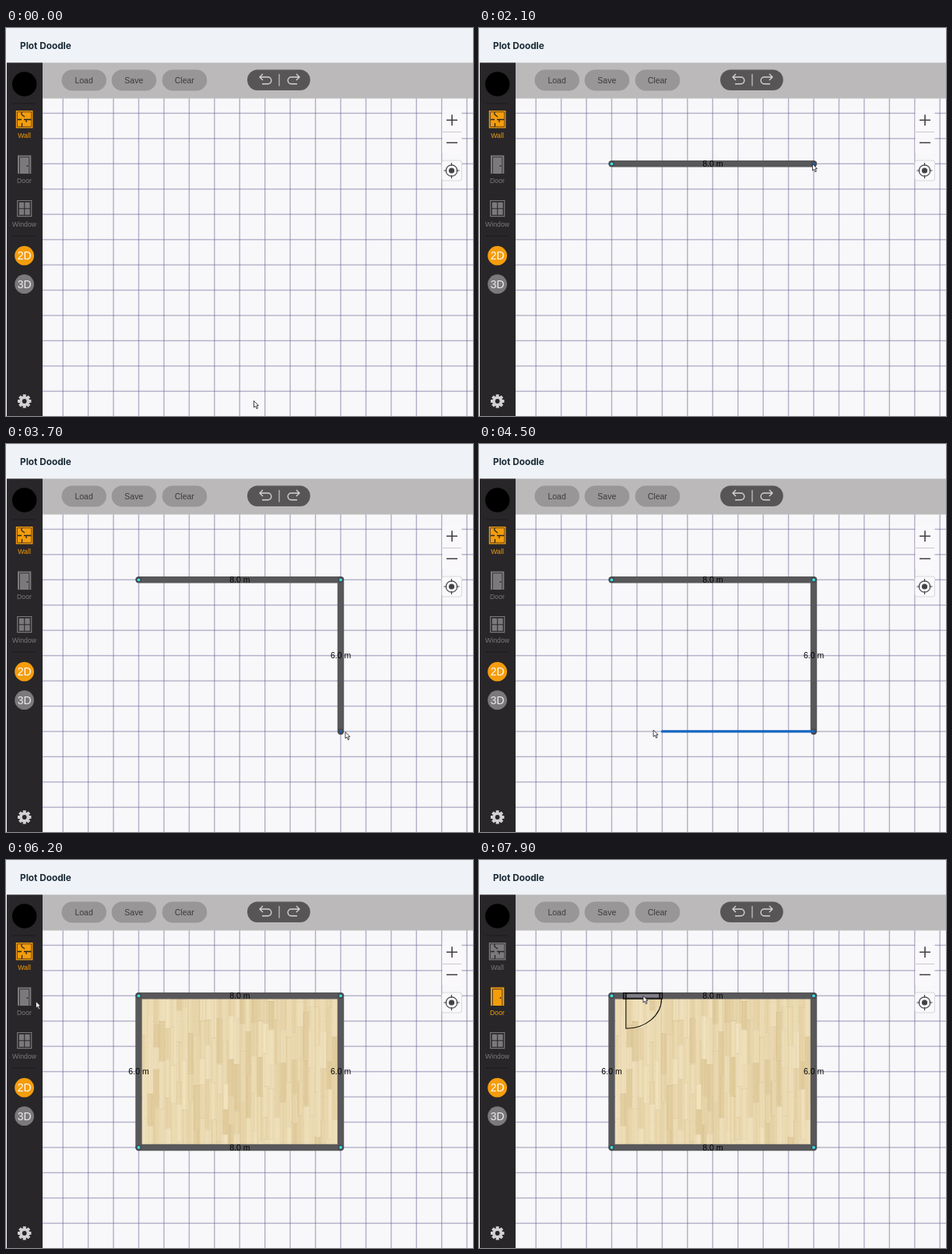
Recreate the animation shown at these times as an HTML page with a canvas. Size 600 by 498 pixels, loop 8 s.

```html
<!DOCTYPE html>
<html lang="en">
<head>
<meta charset="utf-8">
<title>Plot Doodle</title>
<style>
  html, body { margin: 0; width: 100%; height: 100%; overflow: hidden; background: #f8f7f9; }
  canvas { display: block; width: 600px; height: 498px; }
</style>
</head>
<body>
<canvas id="stage" width="600" height="498"></canvas>
<script>
const ctx = document.getElementById('stage').getContext('2d');
const LOOP = 8000, STEP = 100;
const CELL = 32.44, ORIGIN = { x: 170.5, y: 174.3 };
const ORANGE = '#f49d0c', GREY = '#7b797b', DARK = '#282629', WALL = '#58575a';
const SANS = '"Liberation Sans", Arial, sans-serif';

const gridPoint = (col, row) => ({ x: ORIGIN.x + col * CELL, y: ORIGIN.y + row * CELL });
const corners = [gridPoint(0, 0), gridPoint(8, 0), gridPoint(8, 6), gridPoint(0, 6)];
const wallTimes = [2100, 3500, 4700, 5500];
const drawStart = 1600, closed = 5500, doorPicked = 6500;

// time, x, y of the pointer tip
const pointerPath = [
  [0, 318, 478], [400, 262, 300], [500, 262, 300], [1300, 196, 199],
  [1500, 171, 176], [1600, 171, 176], [2100, 428, 174], [2200, 428, 176],
  [2300, 428, 229], [2800, 440, 263], [3200, 436, 369], [3700, 435.5, 369],
  [3900, 434, 369], [4000, 424, 369], [4700, 174, 366], [4900, 171, 366],
  [5200, 169.5, 176], [5300, 169.5, 174], [5900, 165, 178], [6200, 38, 181],
  [6400, 26, 182], [6700, 26, 182], [7300, 200, 176], [7600, 210.5, 174], [8000, 210.5, 174]
];

function pointerAt(t) {
  const i = pointerPath.findIndex(p => p[0] > t);
  const [t0, x0, y0] = pointerPath[i - 1], [t1, x1, y1] = pointerPath[i];
  const u = (t - t0) / (t1 - t0), k = u * u * (3 - 2 * u);
  return { x: x0 + (x1 - x0) * k, y: y0 + (y1 - y0) * k };
}

const snap = p => gridPoint(Math.round((p.x - ORIGIN.x) / CELL), Math.round((p.y - ORIGIN.y) / CELL));

function rect(x, y, w, h, fill) {
  ctx.fillStyle = fill;
  ctx.fillRect(x, y, w, h);
}

function pill(x, y, w, h, r, fill) {
  ctx.beginPath();
  ctx.roundRect(x, y, w, h, r);
  ctx.fillStyle = fill;
  ctx.fill();
}

function disc(x, y, r, fill) {
  ctx.beginPath();
  ctx.arc(x, y, r, 0, 7);
  ctx.fillStyle = fill;
  ctx.fill();
}

function text(label, x, y, size, fill, align = 'center', font = SANS) {
  ctx.font = size + ' ' + font;
  ctx.textAlign = align;
  ctx.fillStyle = fill;
  ctx.fillText(label, x, y);
}

function strokePath(d, color, width, cap = 'butt') {
  ctx.strokeStyle = color;
  ctx.lineWidth = width;
  ctx.lineCap = cap;
  ctx.stroke(new Path2D(d));
}

const line = (a, b, color, width) => strokePath(`M${a.x} ${a.y}L${b.x} ${b.y}`, color, width, 'round');

function makeFloor() {
  const tile = document.createElement('canvas');
  tile.width = 252;
  tile.height = 188;
  const g = tile.getContext('2d');
  let seed = 11;
  const random = () => (seed = seed * 16807 % 2147483647) / 2147483647;
  const shades = ['#f2e3bd', '#eedeb5', '#ecdab0', '#f0e0ba', '#e9d6aa', '#e3ce9f'];
  for (let x = 0; x < 252; x += 7.4) {
    for (let y = -random() * 50; y < 188;) {
      const length = 28 + random() * 42;
      g.fillStyle = shades[Math.floor(random() * shades.length)];
      g.fillRect(x, y, 7.4, length);
      g.fillStyle = 'rgba(170,135,80,.1)';
      for (let n = 0; n < 3; n++) g.fillRect(x + random() * 7, y, .7, length);
      g.fillStyle = 'rgba(160,125,70,.22)';
      g.fillRect(x, y, .6, length);
      g.fillRect(x, y, 7.4, .6);
      y += length;
    }
  }
  return tile;
}
const floor = makeFloor();

function drawGrid() {
  rect(0, 0, 600, 498, '#f8f7f9');
  for (let i = -3; i < 14; i++) {
    const p = gridPoint(i, i);
    rect(p.x - .7, 90, 1.4, 408, 'rgba(97,92,145,.46)');
    rect(47, p.y - .7, 553, 1.4, 'rgba(97,92,145,.46)');
  }
}

function drawZoomPanel() {
  pill(560.5, 105, 25, 57, 3, 'rgba(250,249,251,.94)');
  rect(561, 133, 24, 1, '#c9c8ce');
  strokePath('M566 118.3H580M573 111.3V125.3M566 147.3H580', '#414042', 1.6);
  pill(559.5, 169.5, 26.5, 27, 4, '#d9d8dd');
  pill(560.5, 170.5, 24.5, 25, 3, '#f9f8fa');
  ctx.beginPath();
  ctx.arc(572.5, 183, 7.2, 0, 7);
  ctx.strokeStyle = '#444244';
  ctx.lineWidth = 1.2;
  ctx.stroke();
  disc(572.5, 183, 3.6, '#444244');
  strokePath('M572.5 173V177M572.5 189V193M562.5 183H566.5M578.5 183H582.5', '#444244', 1.2);
}

function drawToolbar() {
  rect(0, 0, 600, 44.5, '#eff2f6');
  text('Plot Doodle', 18, 27, '700 11.8px', '#1b2b38', 'left', 'Inter, sans-serif');
  rect(47, 44.5, 553, 46, '#bbb9ba');
  [['Load', 71.5], ['Save', 135.7], ['Clear', 200.7]].forEach(([label, x]) => {
    pill(x, 53.5, 57.5, 27, 13.5, '#989697');
    text(label, x + 28.6, 70.5, '10.5px', '#3d3b3d');
  });
  pill(310, 53.5, 80.8, 26.5, 13.2, '#575556');
  strokePath('M351 59V74.5', '#c9c8c9', 1.2);
  const arrow = 'M330 59L326 63L330 67M326 63H336.5A4.3 4.3 0 0 1 336.5 71.7H329';
  strokePath(arrow, '#d4d3d4', 1.4);
  ctx.save();
  ctx.translate(703, 0);
  ctx.scale(-1, 1);
  strokePath(arrow, '#d4d3d4', 1.4);
  ctx.restore();
}

function drawGear(x, y) {
  ctx.save();
  ctx.translate(x, y);
  for (let i = 0; i < 8; i++) {
    rect(-2, -8.7, 4, 4, '#d2d1d3');
    ctx.rotate(Math.PI / 4);
  }
  disc(0, 0, 6.6, '#d2d1d3');
  disc(0, 0, 2.9, DARK);
  ctx.restore();
}

function drawSidebar(doorMode) {
  rect(1, 44.5, 46, 453.5, DARK);
  disc(23.7, 72, 15.7, '#000');
  rect(9, 96.5, 28, 1, '#1b191c');
  rect(9, 266.5, 28, 1, '#1b191c');

  const wallColor = doorMode ? GREY : ORANGE, doorColor = doorMode ? ORANGE : GREY;
  rect(12.8, 106, 21.6, 22.5, wallColor);
  strokePath('M14.5 107.7H32.7V126.8H14.5Z', DARK, .7);
  strokePath('M15 117.5H20M23 117.5H32.5M26 117.5V121M20.5 127V122M20 108V111L24 114', DARK, 1.3);
  text('Wall', 23.5, 141, '8.75px', wallColor);

  rect(15, 163.5, 17.3, 23.5, doorColor);
  strokePath('M17.5 187V165.7H29.8V187', DARK, .8);
  disc(27.5, 177, .9, DARK);
  text('Door', 23.5, 198.5, '8.75px', doorColor);

  strokePath('M14.7 221.5H32.7V241.7H14.7Z', GREY, 1.2);
  for (const x of [16.8, 24.3]) for (const y of [223.7, 232.3]) rect(x, y, 6.4, 7.6, GREY);
  text('Window', 23.5, 255, '8.75px', GREY);

  disc(23.6, 292.2, 12.4, ORANGE);
  disc(23.6, 328.7, 12.4, GREY);
  text('2D', 23.6, 297.2, '14px', '#fff');
  text('3D', 23.6, 333.7, '14px', '#eee');
  drawGear(23.7, 479);
}

function drawPlan(t, pointer) {
  if (t < drawStart) return;
  const placed = wallTimes.filter(time => t >= time).length;
  const isClosed = t >= closed;
  const target = snap(pointer);
  if (isClosed) ctx.drawImage(floor, 174.5, 178, 252, 188);

  for (let i = 0; i < placed; i++) line(corners[i], corners[(i + 1) % 4], WALL, 8.4);
  if (placed) corners.slice(0, placed + 1).forEach(c => disc(c.x, c.y, 3.7, '#49484b'));
  if (!isClosed) line(corners[placed], target, '#1565c0', 3.3);

  corners.slice(0, isClosed ? 4 : placed).forEach(c => {
    const hovered = !isClosed && c.x === target.x && c.y === target.y;
    if (!hovered) disc(c.x, c.y, 1.9, '#2fe3e6');
  });
  for (let i = 0; i < placed; i++) {
    const a = corners[i], b = corners[(i + 1) % 4];
    text(i % 2 ? '6.0 m' : '8.0 m', (a.x + b.x) / 2, (a.y + b.y) / 2 + 3.8, '10.5px', '#000');
  }
}

function drawDoor(x) {
  ctx.save();
  ctx.translate(x, 0);
  rect(-25, 170.7, 50, 7.5, '#4b4a4d');
  rect(-21, 172.3, 42, 4, '#817d88');
  strokePath('M-25 170.7H25V178.2H-25ZM-21.5 171V178M21.5 171V178', '#0b0b0b', 1.2);
  strokePath('M-21.7 178V216.3A45.7 38.3 0 0 0 24 178', '#0b0b0b', 1.1);
  ctx.restore();
}

function drawPointer(p) {
  ctx.save();
  ctx.translate(p.x, p.y);
  const shape = new Path2D('M.5 .5V9L2.5 7.2L4 10.7L5.5 10L4 6.7H6.5Z');
  ctx.fillStyle = '#fff';
  ctx.strokeStyle = '#302e38';
  ctx.lineWidth = .9;
  ctx.fill(shape);
  ctx.stroke(shape);
  ctx.restore();
}

function render(now) {
  const t = Math.floor(now % LOOP / STEP) * STEP;
  const pointer = pointerAt(t);
  const doorMode = t >= doorPicked;
  drawGrid();
  drawPlan(t, pointer);
  if (doorMode && pointer.x > 192) drawDoor(pointer.x);
  drawZoomPanel();
  drawToolbar();
  drawSidebar(doorMode);
  drawPointer(pointer);
}

const begin = performance.now();
(function frame() {
  render(performance.now() - begin);
  requestAnimationFrame(frame);
})();
</script>
</body>
</html>
```
